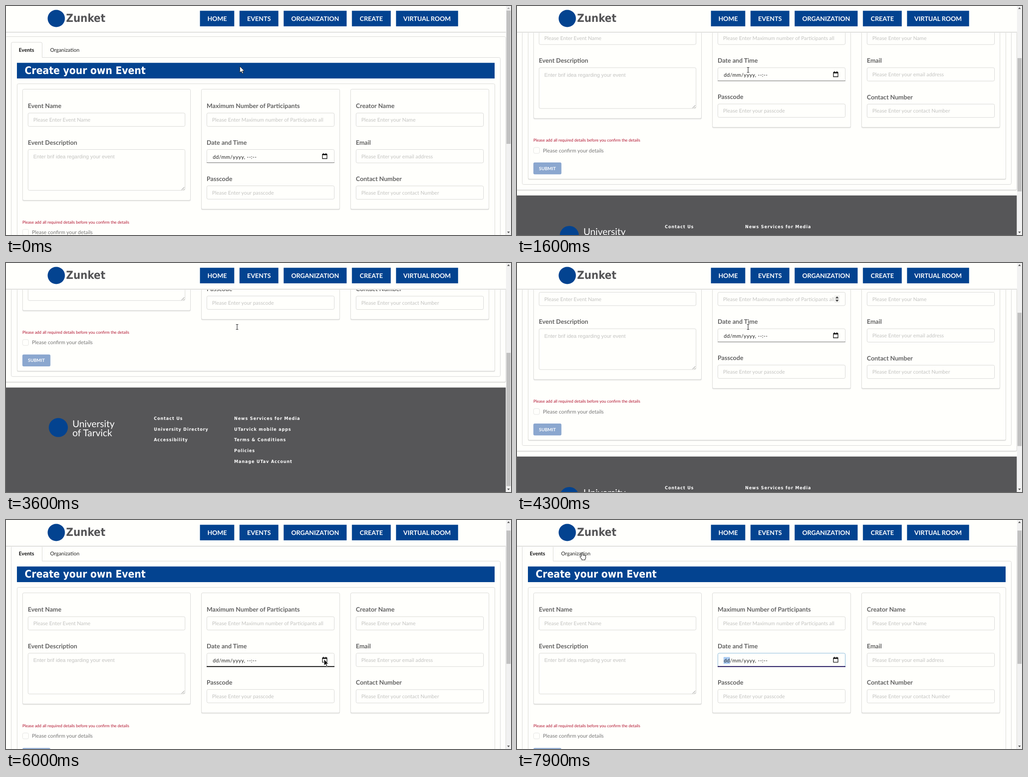
An HTML page for the animation above (8 s loop, 1110 px wide and 505 px high).

```html
<!DOCTYPE html>
<html lang="en">
<head>
<meta charset="utf-8">
<title>Create event form</title>
<style>
html, body { margin: 0; width: 100%; height: 100%; overflow: hidden; background: #fffffc; }
svg { display: block; width: 1110px; height: 505px; }
text { font: 11.4px Lato, sans-serif; white-space: pre; text-rendering: geometricPrecision; }
.nav { font-size: 13.8px; font-weight: 700; fill: #fff; text-anchor: middle; }
.brand { font: 700 24.4px "DejaVu Sans Condensed", "Open Sans", sans-serif; fill: #555557; }
.title { font: 700 23px "DejaVu Sans Condensed", "Open Sans", sans-serif; fill: #fff; }
.label { font-size: 13.65px; font-weight: 700; fill: #626262; }
.hint { fill: #c3c3c1; }
.area { font-family: "Liberation Sans", Arial, sans-serif; fill: #c3c3c1; }
.date { fill: #222; letter-spacing: .4px; }
.tab { fill: #222; }
.bold { font-weight: 700; fill: #111; }
.error { font-size: 8.94px; fill: #b0102c; }
.confirm { fill: #767676; }
.submit { font-size: 9.75px; font-weight: 700; fill: #fff; text-anchor: middle; }
.school { font-size: 20.8px; fill: #fff; }
.link { font: 700 9.8px "DejaVu Sans Condensed", "Open Sans", sans-serif; letter-spacing: 1px; fill: #fff; }
</style>
</head>
<body>
<svg id="stage" viewBox="0 0 1110 505"></svg>
<script>
const NS = 'http://www.w3.org/2000/svg';
const BLUE = '#034390', PAPER = '#fffffc', LINE = '#d8d8d6';
const stage = document.getElementById('stage');

function add(parent, tag, attrs, content) {
  const el = document.createElementNS(NS, tag);
  for (const k in attrs) el.setAttribute(k, attrs[k]);
  if (content) el.textContent = content;
  return parent.appendChild(el);
}
const fillBox = (p, x, y, width, height, fill, rx = 0) => add(p, 'rect', { x, y, width, height, fill, rx });
const outline = (p, x, y, width, height, stroke = LINE) =>
  add(p, 'rect', { x: x + .5, y: y + .5, width: width - 1, height: height - 1, rx: 3, fill: PAPER, stroke });
const write = (p, cls, x, y, str) => add(p, 'text', { class: cls, x, y }, str);
const path = (p, d, attrs) => add(p, 'path', { d, ...attrs });
const show = (el, on) => el.setAttribute('visibility', on ? 'visible' : 'hidden');

function card(p, x, y, w, h) {
  fillBox(p, x, y + 1.5, w, h, '#e6e6e4', 3);
  outline(p, x, y, w, h);
}
function field(x, y, w, label, hint) {
  write(page, 'label', x, y - 10.3, label);
  const box = outline(page, x, y, w, 30.5);
  if (hint) write(page, 'hint', x + 12, y + 19.5, hint);
  return box;
}

// Scrolling page
const page = add(stage, 'g', {});
card(page, -2, 67, 1101, 519.5);
outline(page, 11, 113, 1076, 461.5);
path(page, 'M11.5 116V83q0-3 3-3H76.500q3 0 3 3V113.500', { fill: PAPER, stroke: LINE });
fillBox(page, 12, 112, 67, 6, PAPER);
write(page, 'bold', 28, 101, 'Events');
write(page, 'tab', 97, 101, 'Organization');
card(page, 24, 171, 1051, 391.5);
fillBox(page, 24, 125.3, 1050, 34.5, BLUE);
write(page, 'title', 41, 150, 'Create your own Event');

card(page, 36, 183, 370, 246);
card(page, 429, 183, 305, 265.5);
card(page, 757, 183, 305, 265.5);

field(48, 235.5, 346, 'Event Name', 'Please Enter Event Name');
write(page, 'label', 48, 305.7, 'Event Description');
outline(page, 48, 316, 346, 91);
write(page, 'area', 60, 336, 'Enter brif idea regarding your event');
path(page, 'M386 405.500l6-6M390 405.500l2-2', { stroke: '#777', fill: 'none' });

field(441, 235.5, 281, 'Maximum Number of Participants', 'Please Enter Maximum number of Participants all');
const spinner = add(page, 'g', {});
fillBox(spinner, 698, 243, 11, 16, '#efefed');
path(spinner, 'M700 249.500l3.500-4.500 3.500 4.500zM700 252.500l3.500 4.500 3.500-4.500z', { fill: '#444' });

const dateBox = field(441, 316, 281, 'Date and Time');
const dayMark = fillBox(page, 454, 325, 14, 15, '#a9cbf3');
write(page, 'date', 454.500, 336.500, 'dd/mm/yyyy, --:--');
path(page, 'M695.500 327.500h10v9h-10z', { fill: 'none', stroke: '#111', 'stroke-width': 1.3 });
path(page, 'M695 326h11v3h-11zM697 324.500h1.500v2h-1.500zM702.500 324.500h1.500v2h-1.500z', { fill: '#111' });
const dateLine = fillBox(page, 441, 345, 281, 2, '#111');

field(441, 396, 281, 'Passcode', 'Please Enter your passcode');
field(769, 235.5, 281, 'Creator Name', 'Please Enter your Name');
field(769, 316, 281, 'Email', 'Please Enter your email address');
field(769, 396.3, 281, 'Contact Number', 'Please Enter your contact Number');

write(page, 'error', 36, 479.800, 'Please add all required details before you confirm the details');
outline(page, 36, 492, 14, 14, '#e4e4e2');
write(page, 'confirm', 57, 503, 'Please confirm your details');
fillBox(page, 36, 525.500, 61.600, 26.200, '#8ba7cf', 3);
write(page, 'submit', 66.800, 542, 'SUBMIT');

fillBox(page, 0, 598.300, 1098.500, 240, '#565658');
add(page, 'circle', { cx: 115, cy: 686.500, r: 21, fill: BLUE });
write(page, 'school', 146, 685.500, 'University');
write(page, 'school', 146, 705.500, 'of Tarvick');
const links = [
  [325, ['Contact Us', 'University Directory', 'Accessibility']],
  [501.500, ['News Services for Media', 'UTarvick mobile apps', 'Terms & Conditions', 'Policies', 'Manage UTav Account']]
];
for (const [x, names] of links) names.forEach((s, i) => write(page, 'link', x, 670 + 23.600 * i, s));

// Fixed header
fillBox(stage, 0, 0, 1099, 57, PAPER);
fillBox(stage, 0, 57, 1099, 1, '#d2d2d0');
fillBox(stage, 0, 58, 1099, 1, '#ededeb');
add(stage, 'circle', { cx: 110.500, cy: 27.500, r: 19, fill: BLUE });
write(stage, 'brand', 132, 35, 'Zunket');
const nav = [[426, 76, 'HOME'], [513, 86, 'EVENTS'], [610, 139, 'ORGANIZATION'], [760, 86, 'CREATE'], [857, 137, 'VIRTUAL ROOM']];
for (const [x, w, s] of nav) {
  fillBox(stage, x + .3, 10.5, w - .6, 34.3, BLUE);
  write(stage, 'nav', x + w / 2, 32.500, s);
}

// Scrollbar
fillBox(stage, 1099, 0, 11, 505, '#f1f1f1');
const upArrow = path(stage, 'M1101.500 6.500l3-3.500 3 3.500z', {});
path(stage, 'M1101.500 497.500l3 3.500 3-3.500z', { fill: '#505050' });
const thumb = fillBox(stage, 1100, 10, 9, 294, '#c1c1c1');

// Pointers
const arrow = path(stage, 'M0 0V14L3.200 11 5.500 16 7.700 15 5.400 10.200H9.800Z', { 'stroke-width': .9 });
const beam = add(stage, 'g', {});
const beamShape = 'M-2.500 -5.500H-.7L0 -5 .7 -5.500H2.500M0 -5V5M-2.500 5.500H-.7L0 5 .7 5.500H2.500';
path(beam, beamShape, { fill: 'none', stroke: '#fff', 'stroke-width': 2.500 });
path(beam, beamShape, { fill: 'none', stroke: '#222', 'stroke-width': 1.100 });
const hand = path(stage,
  'M-1.500 8V1.500Q-1.500 0 0 0T1.500 1.500V5.500Q3.200 4.700 4 6 5.800 5.300 6.300 6.800 8 6.500 8 8V11Q8 13 6.500 14.500V16H-.5V14.500L-4.500 9.500Q-5 8 -3.300 7.700Z',
  { fill: '#fff', stroke: '#222', 'stroke-width': 1.100, 'stroke-linejoin': 'round' });

// Keys are [ms, value, ...], joined by straight lines
const scrollKeys = [[0, 0], [600, 0], [700, 5], [800, 22], [900, 42.3], [1500, 165], [1700, 196], [2100, 196],
  [2200, 204], [2300, 212], [2400, 212], [2500, 215.4], [2600, 215.4], [3200, 329], [3500, 329], [3600, 323.7],
  [4000, 110], [4100, 110], [4200, 140], [4300, 171.5], [4500, 200], [4700, 200], [5000, 22.8]];
const pointerKeys = [[0, 514, 133], [1200, 514, 133], [1300, 508, 141], [5100, 508, 141], [5600, 681, 313],
  [5700, 681, 313], [6000, 699, 307], [6100, 699, 307], [6200, 704, 309], [6400, 858, 374], [6800, 185, 62],
  [6900, 171, 125], [7000, 171, 125], [7400, 143, 72]];

function at(keys, t) {
  const i = keys.findIndex(k => k[0] > t);
  if (i < 0) return keys[keys.length - 1].slice(1);
  const a = keys[i - 1], b = keys[i], f = (t - a[0]) / (b[0] - a[0]);
  return a.slice(1).map((v, j) => v + (b[j + 1] - v) * f);
}

function draw(now) {
  const t = Math.floor(now % 8000 / 100) * 100;
  const [scroll] = at(scrollKeys, t);
  const [x, y] = at(pointerKeys, t);

  page.setAttribute('transform', `translate(0 ${-scroll})`);
  thumb.setAttribute('y', 10 + scroll * .581);
  upArrow.setAttribute('fill', scroll ? '#505050' : '#a3a3a3');

  const hover = t >= 5600, focus = t >= 6200;
  show(spinner, t >= 4000 && t < 4400);
  show(dayMark, focus);
  dateBox.setAttribute('stroke', focus ? '#85b7d9' : LINE);
  dateLine.setAttribute('fill', focus ? '#20125c' : hover ? '#111' : '#777');
  dateLine.setAttribute('height', hover ? 2 : 1);

  const kind = t >= 7100 ? hand : t >= 1300 && t < 5200 ? beam : arrow;
  for (const p of [arrow, beam, hand]) show(p, p === kind);
  kind.setAttribute('transform', `translate(${x} ${y})`);
  arrow.setAttribute('fill', t < 700 ? '#fff' : '#111');
  arrow.setAttribute('stroke', t < 700 ? '#111' : '#fff');
  requestAnimationFrame(() => draw(performance.now() - start));
}
const start = performance.now();
draw(0);
</script>
</body>
</html>
```
